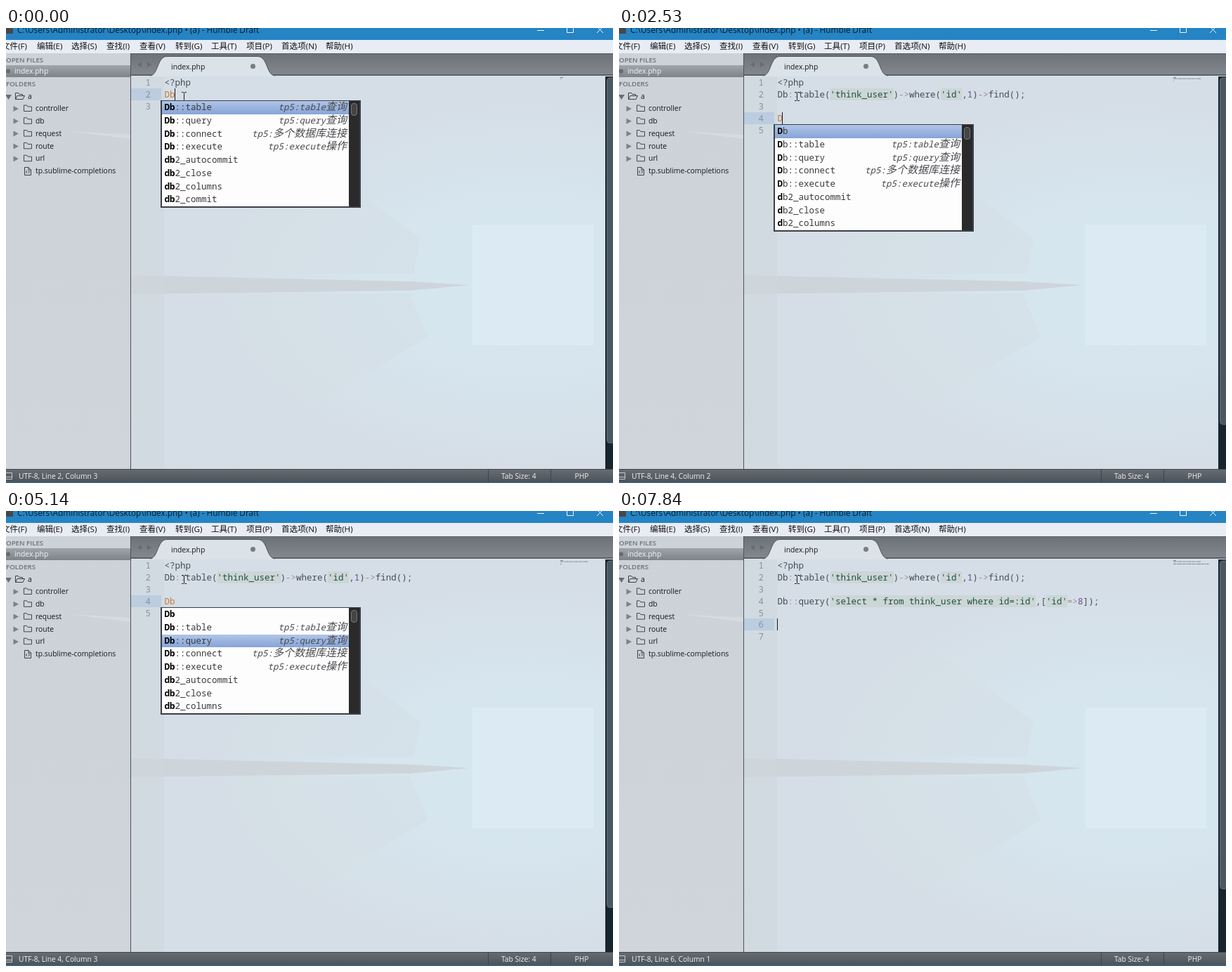
An HTML page for the animation above (8000 ms loop, 864 by 648 pixels).

```html
<!DOCTYPE html>
<html lang="zh">
<head>
<meta charset="utf-8">
<title>index.php</title>
<style>
html, body { margin: 0; width: 100%; height: 100%; overflow: hidden; background: #d5dfe6; }
#stage { position: absolute; left: 0; top: 0; width: 864px; height: 648px; overflow: hidden; }
svg { position: absolute; left: 0; top: 0; }
text { font-family: "Open Sans", "Noto Sans CJK SC", "Noto Sans CJK", sans-serif; font-size: 10.4px; fill: #15181b; }
text.menu { font-size: 11.6px; fill: #111; }
text.title { font-size: 11.8px; fill: #0c1d2a; }
text.head { font-size: 9.7px; fill: #6a7077; font-weight: 600; }
text.stat { font-size: 10.25px; fill: #eef1f3; }
text.light { fill: #f4f6f7; }
#stage div { position: absolute; white-space: pre; }
.mono { font: 12.5px/17px "Noto Sans Mono", "Noto Sans CJK SC", "Noto Sans CJK", monospace; color: #444c53; }
.num { left: 178px; width: 28px; text-align: right; color: #89929a; }
.line { left: 225.5px; }
.line s { text-decoration: none; color: #21503c; background: #ccd6d7; }
.line i { font-style: normal; color: #a08b8c; }
.line b { font-weight: 400; color: #70419c; }
.line u { text-decoration: none; color: #c47a3c; }
#mark { left: 178px; width: 43px; height: 17px; background: #bccde0; }
#caret { width: 1px; height: 17px; background: #14181c; }
#popup { left: 220px; width: 281px; height: 150px; border: 2px solid #3b4046; border-top-width: 1px; background: #2a2a2b; }
#popup .row { left: 0; width: 266px; height: 18.75px; line-height: 18.75px; background: #fdfdfe; }
#popup .row.on { background: linear-gradient(#b0c5e9, #87a4d6); }
.row span { position: absolute; left: 3.5px; top: 0; color: #3a3a3c; }
.row b { color: #000; font-weight: 700; }
.row em { position: absolute; right: 3px; top: 0; color: #48494c; }
.row em span { position: static; font-size: 15px; line-height: 1px; color: inherit; }
#grip { left: 269px; top: 3px; width: 7px; height: 16px; border: 1px solid #777; border-radius: 4px; background: #444; }
</style>
</head>
<body>
<div id="stage">
<svg width="864" height="648">
  <defs>
    <radialGradient id="sky" gradientUnits="userSpaceOnUse" cx="735" cy="365" r="430" gradientTransform="translate(0 146) scale(1 .6)">
      <stop offset="0" stop-color="#d6e7f0"/><stop offset=".5" stop-color="#d6e5ee"/><stop offset="1" stop-color="#d5dee6"/>
    </radialGradient>
    <linearGradient id="side" x2="0" y2="1"><stop stop-color="#cdd2d9"/><stop offset="1" stop-color="#d0d5dc"/></linearGradient>
    <linearGradient id="tabs" x2="0" y2="1"><stop stop-color="#6c7178"/><stop offset="1" stop-color="#858a91"/></linearGradient>
    <linearGradient id="pick" x2="0" y2="1"><stop stop-color="#a0a5aa"/><stop offset="1" stop-color="#7e8388"/></linearGradient>
    <linearGradient id="foot" x2="0" y2="1"><stop stop-color="#676d73"/><stop offset="1" stop-color="#4a5158"/></linearGradient>
  </defs>

  <rect x="178" y="69" width="675" height="559" fill="url(#sky)"/>
  <path d="M178 150 300 175 470 210 590 300 580 350H178ZM178 380 575 378 600 440 440 538 178 610Z" fill="#d5dfe7" opacity=".6"/>
  <path d="M178 352 575 361 660 366 575 374 178 379Z" fill="#cdd5db"/>
  <rect x="664" y="280" width="172" height="172" fill="#dcebf3"/>
  <rect x="178" y="69" width="47" height="559" fill="#cfd7de" opacity=".55"/>

  <rect y="36" width="177" height="592" fill="url(#side)"/>
  <path d="M90 147 177 152V158Z" fill="#d6dbe1"/>
  <rect y="53" width="177" height="17" fill="url(#pick)"/>
  <circle cx="3" cy="61.5" r="3" fill="#656b70"/>

  <rect x="178" y="36" width="686" height="33" fill="url(#tabs)"/>
  <path d="M178 36.5H864" stroke="#5c6167"/>
  <path d="M178 67H864" stroke="#4f555b" stroke-width="1.5"/>
  <rect x="178" y="68" width="686" height="1" fill="#dbe2e8"/>
  <path d="M205 68C217 67 215 40.5 229 40.5H358C373 40.5 370 67 383 68" fill="#dbe2e8" stroke="#4c5258"/>
  <circle cx="351.5" cy="54.5" r="3.5" fill="#777d82"/>
  <path d="M193 48v8l-6-4zM201 48v8l6-4z" fill="#666c72"/>
  <path d="M177.5 36V628" stroke="#4d5257"/>

  <rect width="864" height="17" fill="#2584c3"/>
  <rect x="-2" y="-3" width="12" height="11" fill="#45484b"/>
  <path d="M756 3.5H766M798.5-2V6.5H807.5V-2M841-2l9 9M850-2l-9 9" fill="none" stroke="#eef6fb"/>
  <rect y="17" width="864" height="19" fill="#e8ecf5"/>

  <rect x="853" y="69" width="11" height="559" fill="#18252d"/>
  <rect id="thumb" x="855.5" y="71" width="14" height="520" rx="4" fill="#4c5861" stroke="#66717a"/>

  <rect y="628" width="864" height="20" fill="url(#foot)"/>
  <path d="M0 628.5H864" stroke="#41474d"/>
  <path d="M0 647.5H864" stroke="#2b6d9e"/>
  <path d="M686.5 629V647M775.5 629V647" stroke="#3d4349"/>
  <path d="M-1 633.5H8.5V642.5H-1M-1 639.5H8" fill="none" stroke="#c6cbd0"/>

  <path d="M-1 95H8L3.5 102Z" fill="#686e74"/>
  <g fill="none" stroke="#3a3f44">
    <path d="M13.5 101.500v-9h4l1.500 2h4.500v2M13.500 101.500l2.500-5h10.500l-2.500 5z"/>
    <path d="M26.500 198.500H32l3.500 3.500v7.500h-9zM32 198.500V202h3.500M30 203l-1.500 2 1.500 2M32 203l1.500 2-1.500 2"/>
  </g>
  <g id="labels"></g>
  <g id="map" stroke="#7d878f" stroke-dasharray="4 .8 2 .6 5 .9"></g>
  <text id="status" class="stat" x="18" y="641.5"></text>
</svg>
<div id="mark"></div>
<div id="code"></div>
<div id="caret"></div>
<svg width="864" height="648"><path d="M250 91.5h2.500l1 1 1-1h2.500M253.500 92v11M250 103.500h2.500l1-1 1 1h2.500" fill="none" stroke="#1c2023"/></svg>
<div id="popup"></div>
</div>
<script>
const $ = id => document.getElementById(id);
const LOOP = 8000, LEAD = 16.8, TOP = 69.3, CHAR = 7.5, ROW = 18.75;
const FIND = "Db::table('think_user')->where('id',1)->find();";
const QUERY = "Db::query('select * from think_user where id=:id',['id'=>8]);";
const ITEMS = [
  ["Db", ""], ["Db::table", "tp5:table查询"], ["Db::query", "tp5:query查询"],
  ["Db::connect", "tp5:多个数据库连接"], ["Db::execute", "tp5:execute操作"],
  ["db2_autocommit", ""], ["db2_close", ""], ["db2_columns", ""], ["db2_commit", ""]
];

// t: start, row: caret line, col: caret column, sel: selected item, if the popup is open
const EDITS = [
  { t: 0, row: 2, col: 2, sel: 0 },
  { t: 670, row: 2, col: FIND.length },
  { t: 1520, row: 3, col: 0 },
  { t: 1670, row: 4, col: 0 },
  { t: 2530, row: 4, col: 1, sel: 0 },
  { t: 3540, row: 4, col: 2, sel: 0 },
  { t: 4550, row: 4, col: 2, sel: 1 },
  { t: 4700, row: 4, col: 2, sel: 2 },
  { t: 5270, row: 4, col: QUERY.length },
  { t: 6410, row: 5, col: 0 },
  { t: 6540, row: 6, col: 0 }
];
// times at which the caret is half faded, gone, or back; every edit shows it again
const FADE = { half: [1080, 2090, 2800, 3850, 4980, 7000, 7690], gone: [150, 1230, 2230, 3100, 3980, 5140, 5710, 7120], back: [7840] };
const ALPHA = { half: .5, gone: 0, back: 1 };

const latest = (list, t) => list.reduce((a, b) => b <= t ? b : a, -1);

function caretAlpha(t, since) {
  let best = since, alpha = 1;
  for (const key in FADE) {
    const at = latest(FADE[key], t);
    if (at > best) { best = at; alpha = ALPHA[key]; }
  }
  return alpha;
}

const label = (x, y, str, cls = "") => `<text x="${x}" y="${y}" class="${cls}">${str}</text>`;

function drawLabels() {
  const menu = { "文件(F)": -6, "编辑(E)": 44, "选择(S)": 93, "查找(I)": 143, "查看(V)": 190,
    "转到(G)": 241, "工具(T)": 292, "项目(P)": 342, "首选项(N)": 392, "帮助(H)": 455 };
  let out = label(16, 7, "C:\\Users\\Administrator\\Desktop\\index.php • (a) - Humble Draft", "title");
  for (const name in menu) out += label(menu[name], 30, name, "menu");
  out += label(0, 48.5, "OPEN FILES", "head") + label(0, 83, "FOLDERS", "head");
  out += label(12, 65, "index.php", "light") + label(235, 58.5, "index.php") + label(31, 100.5, "a");
  ["controller", "db", "request", "route", "url"].forEach((name, i) => {
    const y = 114.5 + i * 17.8;
    out += `<path d="M10.5 ${y - 3.5}v8l7.5-4z" fill="#7c8288"/>`;
    out += `<path d="M25.5 ${y + 4}v-8.5h4l1.5 2h5.5v6.5z" fill="none" stroke="#42474c"/>`;
    out += label(42, y + 3.7, name);
  });
  out += label(42, 207, "tp.sublime-completions");
  out += label(705, 641.5, "Tab Size: 4", "stat") + label(809.5, 641.5, "PHP", "stat");
  $("labels").innerHTML = out;
}

const esc = s => s.replace(/&/g, "&amp;").replace(/</g, "&lt;").replace(/>/g, "&gt;");

function paint(text) {
  if (text === "D" || text === "Db") return `<u>${text}</u>`;
  return text.replace(/('[^']*')|(->|=>|::)|(\d)|([^])/g, (m, str, op, num) =>
    str ? `<s>${esc(str)}</s>` : op ? `<i>${esc(op)}</i>` : num ? `<b>${num}</b>` : esc(m));
}

function menuRows(items, sel, hit) {
  return items.map(([name, hint], i) => {
    const note = hint.replace(/[^\x00-\x7f]+/, "<span>$&</span>");
    return `<div class="row mono${i === sel ? " on" : ""}" style="top:${i * ROW}px">` +
      `<span><b>${name.slice(0, hit)}</b>${name.slice(hit)}</span><em>${note}</em></div>`;
  }).join("") + '<div id="grip"></div>';
}

function show({ row, col, sel }) {
  const lines = Array(row + 1).fill("");
  lines[0] = "<?php";
  lines[1] = row === 2 ? FIND.slice(0, col) : FIND;
  if (row >= 4) lines[3] = row === 4 ? QUERY.slice(0, col) : QUERY;
  const lineTop = i => TOP + i * LEAD;

  $("code").innerHTML = lines.map((s, i) =>
    `<div class="mono num" style="top:${lineTop(i)}px">${i + 1}</div>` +
    `<div class="mono line" style="top:${lineTop(i)}px">${paint(s)}</div>`).join("");
  $("map").innerHTML = lines.map((s, i) => s &&
    `<path d="M789 ${70.5 + i * 1.67}h${s.length * .83}"/>`).join("");

  const y = Math.round(lineTop(row - 1));
  $("mark").style.top = y + "px";
  $("caret").style.top = y + "px";
  $("caret").style.left = Math.floor(225 + col * CHAR) + "px";
  $("thumb").setAttribute("height", 520 - (row - 2) * 13.2);
  $("status").textContent = `UTF-8, Line ${row}, Column ${col + 1}`;

  const popup = $("popup"), open = sel !== undefined;
  popup.style.display = open ? "block" : "none";
  popup.style.top = y + 17 + "px";
  if (open) {
    const first = row === 2 ? 1 : 0;
    popup.innerHTML = menuRows(ITEMS.slice(first, first + 8), sel, col);
  }
}

let last;
const start = performance.now();
function tick() {
  const t = (performance.now() - start) % LOOP;
  const edit = EDITS.filter(e => e.t <= t).pop();
  if (edit !== last) show(last = edit);
  $("caret").style.opacity = caretAlpha(t, edit.t);
  requestAnimationFrame(tick);
}

drawLabels();
tick();
</script>
</body>
</html>
```
